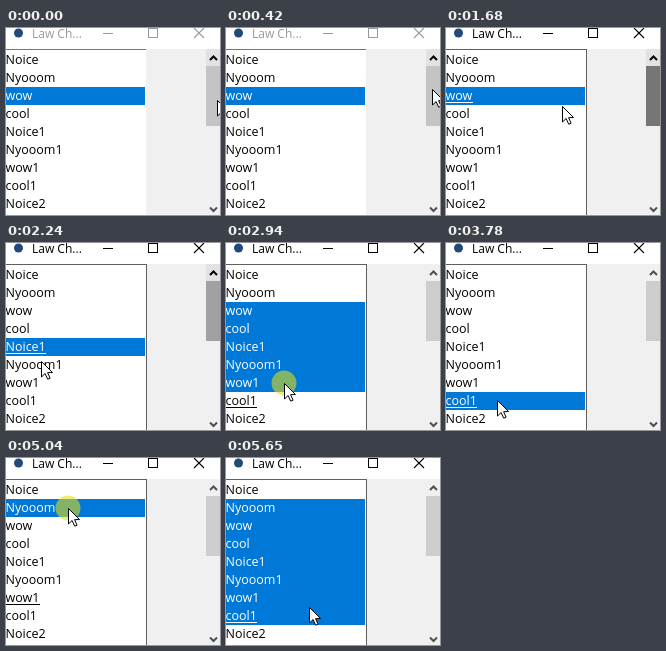
These frames come from a looping animation (214 by 187 pixels, 5690 ms). An HTML page with a canvas:

```html
<!DOCTYPE html>
<html lang="en">
<head>
<meta charset="utf-8">
<title>Listbox selection</title>
<style>
html, body { margin: 0; width: 100%; height: 100%; overflow: hidden; background: #f0f0f0; }
canvas { display: block; width: 214px; height: 187px; }
</style>
</head>
<body>
<canvas id="stage" width="214" height="187"></canvas>
<script>
const ctx = document.getElementById('stage').getContext('2d');
const LOOP = 5690, STEP = 140;
const ROW_TOP = 23, ROW_HEIGHT = 18;
const FONT = '"Open Sans", "Noto Sans", sans-serif';
const words = ['Noice', 'Nyooom', 'wow', 'cool'];
const items = [...words, ...words.map(w => w + 1), 'Noice2'];
const home = { x: 211, y: 72 };

// A press held from step `down` to step `up`, dragged from one point to another
const press = (down, up, x, y, options = {}) => {
  const from = { x, y };
  return { start: down * STEP, end: up * STEP, from, to: options.to || from, add: options.add };
};

const scrollPress = press(6, 10, 200, 50);
const gestures = [
  scrollPress,
  press(14, 15, 31, 106),
  press(18, 19, 47, 152),
  press(20, 22, 52, 68, { to: { x: 60, y: 164 } }),
  press(26, 27, 51, 157),
  press(29, 31, 46, 88, { add: true }),
  press(32, 33, 48, 141, { add: true }),
  press(36, 40, 62, 50, { to: { x: 83, y: 149 } })
];

const clamp = k => Math.min(1, Math.max(0, k));
const lerp = (a, b, k) => a + (b - a) * k;
const between = (a, b, k) => ({ x: lerp(a.x, b.x, k), y: lerp(a.y, b.y, k) });
const easeOut = k => 1 - (1 - k) ** 2;
const smooth = k => k * k * (3 - 2 * k);
const rowAt = y => Math.floor((y - ROW_TOP) / ROW_HEIGHT);

function dragPoint(gesture, t) {
  const k = clamp((t - gesture.start) / (gesture.end - gesture.start));
  return between(gesture.from, gesture.to, easeOut(k));
}

function pointerAt(t) {
  const last = gestures.filter(g => g.start <= t).pop();
  if (last && t < last.end) return dragPoint(last, t);
  const from = last ? last.to : home;
  const startTime = last ? last.end : 0;
  const next = gestures.find(g => g.start > t);
  return next ? between(from, next.from, smooth((t - startTime) / (next.start - startTime))) : from;
}

function selectionAt(t) {
  let rows = [2], active = 2;
  for (const g of gestures) {
    if (g === scrollPress || g.start > t) continue;
    const first = rowAt(g.from.y), last = rowAt(dragPoint(g, t).y);
    const range = items.map((_, i) => i).filter(i => i >= first && i <= last);
    rows = g.add ? [...rows, ...range] : range;
    if (t >= g.end || g.from === g.to) active = last;
  }
  return { rows, active };
}

function rect(color, x, y, w, h) {
  ctx.fillStyle = color;
  ctx.fillRect(x, y, w, h);
}

function line(color, width, ...points) {
  ctx.strokeStyle = color;
  ctx.lineWidth = width;
  ctx.beginPath();
  points.forEach(([x, y]) => ctx.lineTo(x, y));
  ctx.stroke();
}

function disc(color, x, y, r) {
  ctx.fillStyle = color;
  ctx.beginPath();
  ctx.arc(x, y, r, 0, Math.PI * 2);
  ctx.fill();
}

function label(text, color, size, x, y) {
  ctx.fillStyle = color;
  ctx.font = `${size}px ${FONT}`;
  ctx.fillText(text, x, y);
}

function drawTitleBar(focused) {
  const ink = focused ? '#000' : '#999';
  rect('#fff', 0, 0, 214, 21);
  disc('#204a78', 12.5, 5, 4.5);
  label('Law Ch...', ink, 12, 26, 10);
  rect(ink, 97, 5, 10, 1);
  ctx.strokeStyle = ink;
  ctx.lineWidth = 1;
  ctx.strokeRect(142.5, 0.5, 9, 9);
  line(ink, 1.1, [188, 0], [198, 10]);
  line(ink, 1.1, [198, 0], [188, 10]);
}

function drawList({ rows, active }, focused) {
  const border = focused ? '#606060' : '#777';
  rect('#fff', 0, 21, 140, 166);
  rect(border, 0, 21, 140, 1);
  if (focused) rect(border, 140, 21, 1, 166);
  items.forEach((text, i) => {
    const y = ROW_TOP + i * ROW_HEIGHT;
    const selected = rows.includes(i);
    const ink = selected ? '#fff' : '#000';
    if (selected) rect('#0078d7', 0, y, 139, ROW_HEIGHT);
    label(text, ink, 12.5, -0.5, y + 13);
    if (focused && i === active) rect(ink, 0, y + 15, Math.round(ctx.measureText(text).width), 1);
  });
}

function drawChevron(color, y, rise) {
  line(color, 2, [204, y], [207.5, y + rise], [211, y]);
}

function drawScrollbar(t) {
  // The thumb darkens when pressed and fades back slowly afterwards
  const fade = clamp((t - scrollPress.end) / 1400);
  const gray = t < scrollPress.start ? 196 : lerp(96, 205, fade);
  rect('#f0f0f0', 200, 21, 14, 166);
  if (fade < 1) rect('#e2e2e2', 200, 21, 14, 17);
  rect(`rgb(${gray}, ${gray}, ${gray})`, 200, 38, 14, 60);
  drawChevron(fade < 1 ? '#000' : '#505050', 32, -3.5);
  drawChevron('#505050', 179.5, 3.5);
}

function drawPointer({ x, y }, pressed) {
  if (pressed) disc('rgba(225, 222, 20, 0.58)', x, y, 12.5);
  ctx.save();
  ctx.translate(Math.round(x), Math.round(y));
  const arrow = new Path2D('M.5.5V16l3.6-3.5 2.6 5.7 2.4-1-2.5-5.5 4.9-.2z');
  ctx.fillStyle = '#fff';
  ctx.fill(arrow);
  ctx.strokeStyle = '#000';
  ctx.lineWidth = 1;
  ctx.stroke(arrow);
  ctx.restore();
}

function draw() {
  const t = Math.floor(performance.now() % LOOP / STEP) * STEP;
  const focused = t >= scrollPress.start;
  rect('#f0f0f0', 0, 0, 214, 187);
  drawTitleBar(focused);
  drawList(selectionAt(t), focused);
  drawScrollbar(t);
  drawPointer(pointerAt(t), gestures.some(g => t >= g.start && t < g.end));
  requestAnimationFrame(draw);
}

draw();
</script>
</body>
</html>
```
